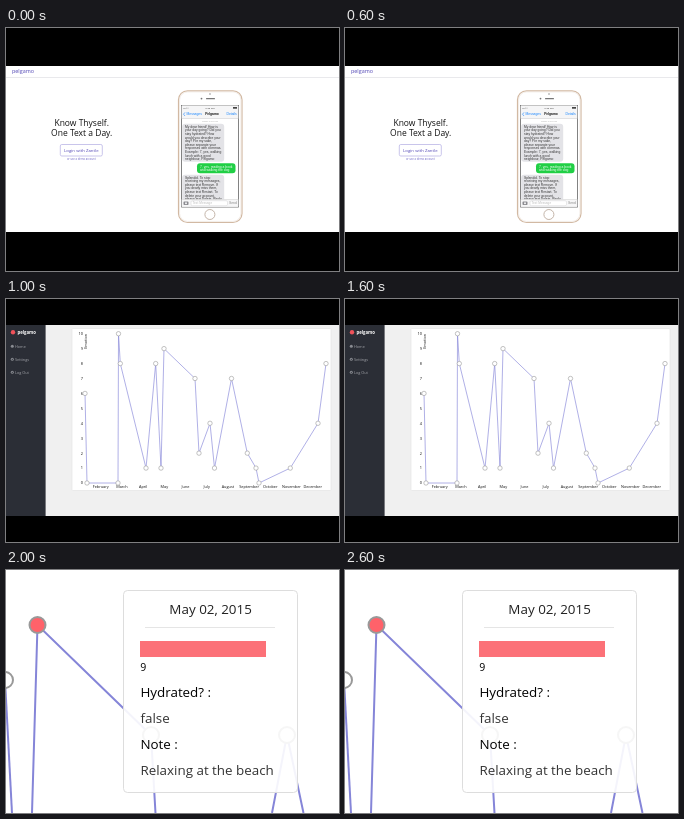
These frames come from a looping animation (333x243 px, 3 s). An HTML page with a canvas:

```html
<!DOCTYPE html>
<html lang="en">
<head>
<meta charset="utf-8">
<title>Mood diary</title>
<style>
  html, body { margin: 0; width: 100%; height: 100%; overflow: hidden; background: #fff; }
  canvas { display: block; width: 333px; height: 243px; }
</style>
</head>
<body>
<canvas id="stage"></canvas>
<script>
const W = 333, H = 243, SCENE_MS = 1000;
const SANS = '"Open Sans", sans-serif';
const PHONE = '"Liberation Sans", sans-serif';
const VIOLET = '#8585d8';
const canvas = document.getElementById('stage');
const ctx = canvas.getContext('2d');
const ratio = window.devicePixelRatio || 1;
canvas.width = W * ratio;
canvas.height = H * ratio;
ctx.scale(ratio, ratio);

function rect(x, y, w, h, color) {
  ctx.fillStyle = color;
  ctx.fillRect(x, y, w, h);
}

function paint(fill, stroke, width) {
  if (fill) { ctx.fillStyle = fill; ctx.fill(); }
  if (stroke) { ctx.strokeStyle = stroke; ctx.lineWidth = width; ctx.stroke(); }
}

function box(x, y, w, h, radius, fill, stroke, width = 1) {
  ctx.beginPath();
  ctx.roundRect(x, y, w, h, radius);
  paint(fill, stroke, width);
}

function dot(x, y, r, fill, stroke, width = 1) {
  ctx.beginPath();
  ctx.arc(x, y, r, 0, Math.PI * 2);
  paint(fill, stroke, width);
}

function path(points, color, width) {
  ctx.beginPath();
  points.forEach(([x, y]) => ctx.lineTo(x, y));
  paint(null, color, width);
}

function text(str, x, y, size, color, { align = 'left', weight = 400, font = SANS } = {}) {
  ctx.font = `${weight} ${size}px ${font}`;
  ctx.textAlign = align;
  ctx.fillStyle = color;
  ctx.fillText(str, x, y);
}

function phoneText(lines, x, y, color) {
  lines.forEach((line, i) => text(line, x, y + i * 3.6, 3.3, color, { font: PHONE }));
}

function drawPhone() {
  box(172.5, 62.8, 63.5, 131.7, 9, '#fff', '#d2b9a3', 1.2);
  box(173.6, 63.9, 61.3, 129.5, 8, null, '#eee5df', 0.7);
  dot(204, 66, 0.7, '#777');
  box(200, 70, 9, 1.3, 0.6, '#777');
  dot(195.5, 70.6, 0.9, '#777');
  dot(203.9, 186.5, 5, '#fff', '#c4b5a9', 1);

  rect(175.2, 77, 57.6, 102.3, '#222');
  rect(175.7, 77.5, 56.6, 101.3, '#fff');
  rect(175.7, 77.5, 56.6, 13, '#f5f5f6');
  rect(175.7, 90.2, 56.6, 0.5, '#c7c7ca');
  text('•••○○', 177, 81, 2.5, '#333', { font: PHONE });
  text('3:45 PM', 204, 81, 2.5, '#333', { font: PHONE, align: 'center' });
  rect(227, 79, 4, 1.7, '#444');
  path([[179, 84.4], [177.5, 86.2], [179, 88]], '#1684ff', 0.6);
  text('Messages', 180.5, 87.4, 3.4, '#1684ff', { font: PHONE });
  text('Pelgamo', 206, 87.4, 3.3, '#111', { font: PHONE, align: 'center', weight: 700 });
  text('Details', 230.8, 87.4, 3.4, '#1684ff', { font: PHONE, align: 'right' });
  text('Today 3:45 PM', 204, 94, 2.4, '#aaa', { font: PHONE, align: 'center' });

  box(176.2, 95.7, 42, 38, 3, '#e3e3e7');
  phoneText([
    'My dear friend! How is', 'your day going? Did you', 'stay hydrated? How',
    'would you describe your', 'day? For my sake,', 'please separate your',
    'responses with commas.', 'Example: 7, yes, walking', 'lunch with a good',
    'neighbour, Pelgamo'
  ], 179, 99.7, '#333');
  box(191, 135.2, 38.5, 10, 3, '#20cf45');
  phoneText(['7, yes, reading a book', 'and walking the dog'], 194, 139.6, '#fff');

  ctx.save();
  ctx.beginPath();
  ctx.rect(176, 146, 57, 25.5);
  ctx.clip();
  box(176.2, 146.8, 42, 31, 3, '#e3e3e7');
  phoneText([
    'Splendid. To stop', 'receiving my messages,', 'please text Remove. If',
    'you dearly miss them,', 'please text Restart. To', 'delete your account,',
    'please text Delete. Reply'
  ], 179, 150.6, '#333');
  ctx.restore();

  rect(175.7, 171.5, 56.6, 7.3, '#f6f6f7');
  rect(175.7, 171.5, 56.6, 0.5, '#ccc');
  box(177.5, 173.6, 5, 3.5, 0.8, '#8c8c91');
  dot(180, 175.3, 1, '#f6f6f7');
  box(185, 172.7, 36.5, 5, 1.4, '#fff', '#d0d0d2', 0.5);
  text('Text Message', 186.5, 176.4, 3.2, '#bbb', { font: PHONE });
  text('Send', 230.8, 176.4, 3.4, '#888', { font: PHONE, align: 'right' });
}

function drawLanding() {
  rect(0, 0, W, H, '#000');
  rect(0, 38, W, 166, '#fff');
  rect(0, 49, W, 0.8, '#e4e4e8');
  text('pelgamo', 6, 45.2, 5.4, '#5146b5');
  text('Know Thyself.', 75.7, 97.8, 8.5, '#111', { align: 'center' });
  text('One Text a Day.', 75.7, 107.8, 8.5, '#111', { align: 'center' });
  box(54.3, 116.5, 42, 11.5, 1.5, '#fff', '#bbb7e6', 0.8);
  text('Login with Zantle', 75.3, 124, 4.35, '#5146b5', { align: 'center' });
  text('or use a demo account', 75.3, 132.2, 2.7, '#6b62c4', { align: 'center' });
  drawPhone();
}

// Each entry is [x, mood score].
const MOODS = [
  [79, 6], [81, 0], [112, 0], [112.5, 10], [114.3, 8], [140, 1], [149.7, 8],
  [155, 1], [158, 9], [189, 7], [193, 2], [204, 4], [208.5, 1], [225.5, 7],
  [241.3, 2], [250, 1], [253, 0], [284.3, 1], [312, 4], [320, 8]
];
const MONTHS = ['February', 'March', 'April', 'May', 'June', 'July', 'August',
  'September', 'October', 'November', 'December'];
const moodY = score => 184 - score * 14.93;

function drawDashboard() {
  rect(0, 0, W, H, '#000');
  rect(0, 26, W, 191, '#f0f0f0');
  rect(0, 26, 39.6, 191, '#2b2e36');
  dot(7, 33.3, 2.2, '#f0525a');
  text('pelgamo', 11.5, 35.4, 4.3, '#fff', { weight: 700 });
  ['Home', 'Settings', 'Log Out'].forEach((label, i) => {
    const y = 47.3 + i * 13;
    dot(6.3, y, 1.5, '#898c92');
    if (i) dot(6.3, y, 0.6, '#2b2e36');
    text(label, 9, y + 1.4, 3.8, '#a5a7ac');
  });

  box(66, 29.5, 259, 162, 0.5, '#fff', '#e6e6e6', 0.7);
  for (let score = 0; score <= 10; score++) {
    text(score, 77, moodY(score) + 1.4, 3.9, '#111', { align: 'right' });
  }
  MONTHS.forEach((month, i) =>
    text(month, 94.7 + i * 21.2, 189.3, 3.85, '#111', { align: 'center' }));
  ctx.save();
  ctx.translate(81.3, 35);
  ctx.rotate(-Math.PI / 2);
  text('Emotion', 0, 0, 3.8, '#111', { align: 'right' });
  ctx.restore();

  const points = MOODS.map(([x, score]) => [x, moodY(score)]);
  path(points, VIOLET, 0.65);
  points.forEach(([x, y]) => dot(x, y, 2.2, '#fff', '#999', 0.6));
}

function drawDetail() {
  rect(0, 0, W, H, '#fff');
  path([[-1, 110], [6, 243]], VIOLET, 2);
  path([[26, 243], [31.5, 55], [145, 165], [149.5, 243]], VIOLET, 2);
  path([[266, 243], [281, 165], [297.5, 243]], VIOLET, 2);
  dot(-1, 110, 8, '#fff', '#999', 2);
  dot(31.5, 55, 8, '#ff626a', '#999', 2);
  dot(145, 165, 8, '#fff', '#999', 2);
  dot(281, 165, 8, '#fff', '#999', 2);

  box(117.5, 20.5, 174, 202, 4, 'rgba(255,255,255,.91)', '#ddd');
  text('May 02, 2015', 204.6, 44, 13.4, '#222', { align: 'center' });
  rect(139, 57, 130, 1, '#e5e5e5');
  rect(134, 71, 126, 16, '#fc7178');
  text('9', 134.3, 101, 10.5, '#000');
  text('Hydrated? :', 134.4, 127, 13.4, '#000');
  text('false', 134.4, 153, 13.4, '#333');
  text('Note :', 134.4, 179, 13.4, '#000');
  text('Relaxing at the beach', 134.4, 205, 13.4, '#333');
}

const scenes = [drawLanding, drawDashboard, drawDetail];
const start = performance.now();

function tick() {
  const elapsed = performance.now() - start;
  scenes[Math.floor(elapsed / SCENE_MS) % scenes.length]();
  requestAnimationFrame(tick);
}
tick();
</script>
</body>
</html>
```
